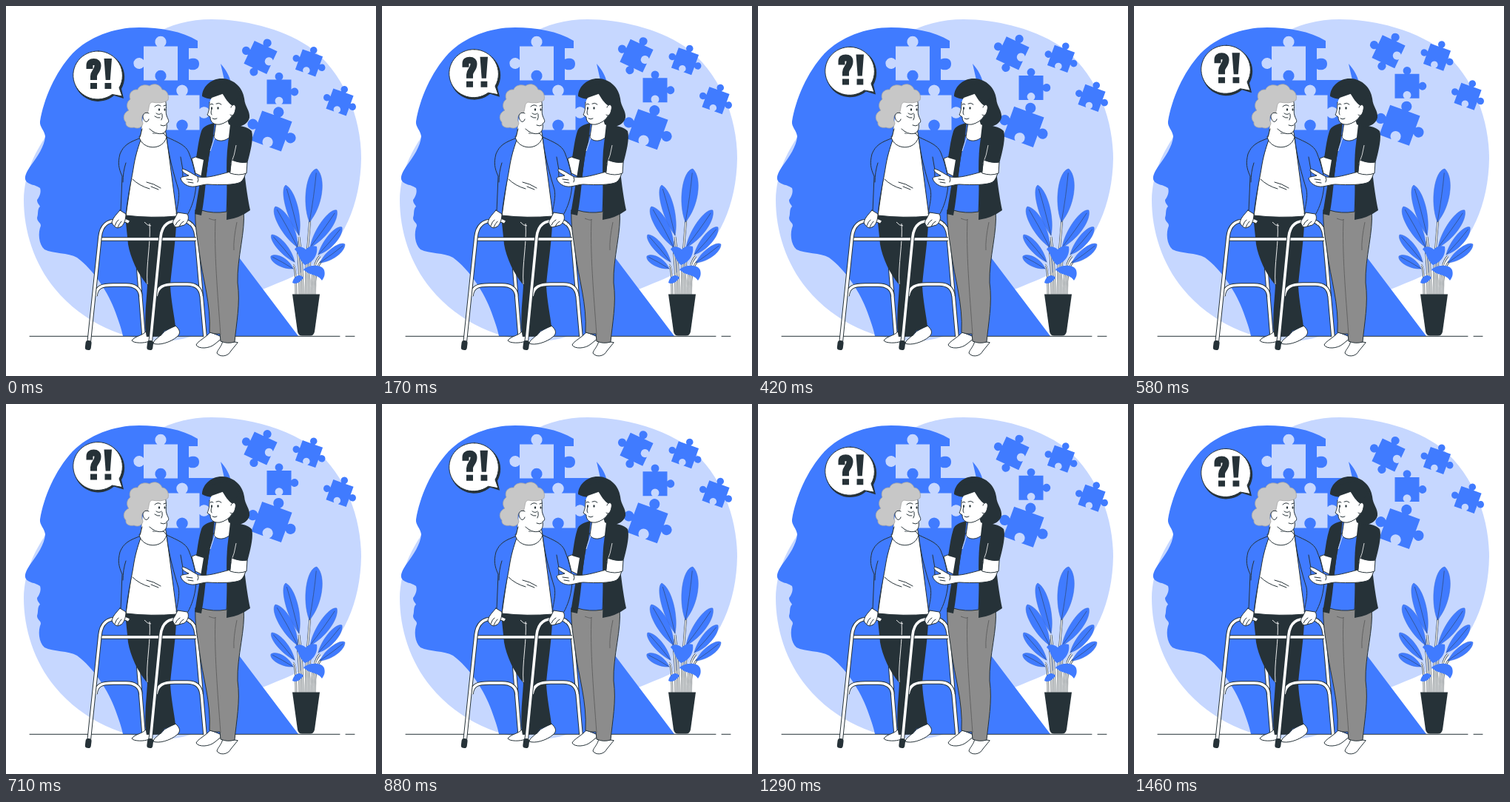
Recreate the animation shown at these times as an HTML page. Size 500 by 500 pixels, loop 1500 ms.

```html
<!DOCTYPE html>
<html lang="en">
<head>
<meta charset="utf-8">
<title>Walking together</title>
<style>
html, body { margin: 0; width: 100%; height: 100%; overflow: hidden; background: #fff; }
svg { display: block; width: 100vw; height: 100vh; }
.blue { fill: #407bff; }
.pale { fill: #c6d7ff; }
.dark { fill: #263238; }
.grey { fill: #8c8c8c; }
.skin { fill: #fff; }
.out { stroke: #263238; stroke-width: 1; stroke-linejoin: round; stroke-linecap: round; }
.line { fill: none; stroke: #263238; stroke-width: 1; stroke-linecap: round; stroke-linejoin: round; }
.tube { fill: none; stroke: #263238; stroke-width: 5.6; }
.core { fill: none; stroke: #fff; stroke-width: 3.6; }
</style>
</head>
<body>
<svg viewBox="0 0 500 500" xmlns="http://www.w3.org/2000/svg">
  <!-- backdrop -->
  <path class="pale" d="M200 38C222 25 248 18 278 18C320 18 372 30 408 54C456 88 480 150 480 206C479 268 456 322 412 352C380 374 342 380 312 402C284 428 264 450 216 453C160 453 104 428 66 382C38 348 24 304 24 262C25 226 38 200 54 176Z"/>
  <path class="blue" d="M180 29C145 29 112 42 90 64C66 90 51 126 46 156C45 163 52 168 53 176C52 190 42 204 34 215C29 222 25 229 26 234C28 242 40 241 46 246C48 252 45 258 42 262C42 267 45 268 46 271C42 274 44 281 42 286C42 292 47 292 47 297C43 306 44 322 52 329C64 335 84 333 96 340C118 356 139 388 148 414C153 428 156 436 158 446H395L312 336C298 318 296 290 300 262C306 220 318 160 304 104C302 94 297 86 290 78L295 100H247V85C250 87 261 88 261 78C261 69 250 70 247 72V57H259V47C238 34 208 29 180 29Z"/>
  <g id="holes" class="pale"></g>
  <path class="line" d="M32 446.3H451M459 446.3H471"/>

  <!-- floating parts -->
  <g id="float">
    <g id="pieces" class="blue"></g>
    <path class="dark" d="M127 63A33 33 0 0 1 156 112L159 125L146 121A33 33 0 1 1 127 63Z"/>
    <path class="skin out" d="M125 61A33 33 0 0 1 153 110.500L157 122L143.500 119.500A33 32.500 0 1 1 125 61Z"/>
    <path d="M113 85V80Q113 75.500 118.500 75.500Q124 75.500 124 80.500C124 88 118.500 89 118.500 95V100" fill="none" stroke="#263238" stroke-width="9"/>
    <path class="dark" d="M114 104H123V112H114ZM132.500 71H143L140.800 100H134.700ZM133.500 104H142.300V112H133.500Z"/>
  </g>

  <!-- plant -->
  <g id="plant"></g>
  <path class="dark" d="M387 389.500H424L417 440Q416 445.500 411 445.500H400Q395 445.500 394 440Z"/>

  <!-- older woman -->
  <g id="far"></g>
  <path class="skin out" d="M189 440C184 446 174 446 170 452C172 456 188 456 193 453L195 442Z"/>
  <path class="skin out" d="M229 432C236 438 236 443 231 447C222 455 206 459 199 456C200 450 210 446 214 440Z"/>
  <path class="dark" d="M161 283H230C231 310 224 350 222 378C223 398 227 416 229 433L214 439L209 446L190 447C186 428 190 398 191 377C178 362 168 340 165 322Z"/>
  <path d="M194 294C196 320 189 350 191 376M187 292Q191 297 196 297" fill="none" stroke="#fff" stroke-width=".9"/>
  <path class="skin out" d="M182 176L184 160H214L217 177L222 215L231 284Q196 287 162 283L172 214Z"/>
  <path class="blue out" d="M183 178C166 184 159 188 154 200C151 212 152 219 157 230L155 278L162 283C164 258 170 234 173 214C176 198 179 190 183 178Z"/>
  <path class="blue out" d="M217 177C232 184 243 188 247 198C254 216 259 235 256 250C254 264 249 276 244 284L230 281C232 268 235 258 233 248C227 228 220 204 217 177Z"/>
  <path class="line" d="M171 234Q180 243 194 247M190 238Q200 240 209 246M196 244L206 248M162 212Q158 224 158 238M236 204Q240 220 239 236"/>
  <path class="skin out" d="M180 177C184 195 212 196 217 177L213 172H186Z"/>
  <path class="skin" d="M182 176L185 150L196 125L216 126C218 136 215 142 217 148C219 154 222 156 217 159C218 164 217 170 212 172C207 174 201 172 198 171L199 180Z"/>
  <path class="line" d="M215 125C218 136 215 142 217 148C219 154 222 156 217 159C218 164 217 170 212 172C206 174 199 171 194 166M184 166L181 177"/>
  <path d="M219 127C221 119 216 113 211 113C208 105 199 104 194 108C187 105 179 108 178 113C170 112 165 119 168 126C162 130 163 138 166 141C159 144 157 152 162 157C161 164 169 165 173 164C179 167 185 163 185 158C181 152 185 143 191 145C194 139 192 132 197 130C204 131 213 132 219 127Z" fill="#c7c7c7" stroke="#a5a5a5" stroke-width=".8"/>
  <path class="skin out" d="M193 145C187 142 183 148 186 153C188 158 192 157 193 153"/>
  <path class="line" d="M201 136Q205 132 209 135M213 135L216 134M203 145Q207 148 210 145M201 149Q205 152 208 151M209 161Q213 163 216 161M211 146Q212 151 210 154"/>
  <ellipse class="dark" cx="207" cy="140" rx="1.200" ry="1.800"/>
  <ellipse class="dark" cx="214.500" cy="140" rx="1" ry="1.700"/>
  <g id="near"></g>
  <path class="skin out" d="M154 276L162 281C162 288 160 294 156 298L151 300C147 299 144 296 143 292C145 285 150 281 154 276Z"/>
  <path class="line" d="M147 297Q149 291 152 289M151 299Q153 294 156 291"/>
  <path class="skin out" d="M232 279L245 281C248 286 246 292 241 296L230 299C226 297 225 293 226 290C229 286 230 283 232 279Z"/>
  <path class="line" d="M229 296Q231 291 235 289M234 298Q236 293 240 291"/>

  <!-- younger woman -->
  <path class="skin out" d="M276 441C270 448 259 453 257 458C260 464 275 463 282 457L293 448Z"/>
  <path class="skin out" d="M293 452C292 460 286 464 285 469C289 475 300 474 304 466L313 455Z"/>
  <path class="grey out" d="M256 276H321C324 304 312 340 313 374C317 402 311 430 309 454Q299 457 290 453L289 443Q282 444 275 441C277 402 266 370 261 332C258 310 255 296 256 276Z"/>
  <path d="M274 287Q284 291 283 288C281 330 286 390 290 444M312 292Q307 316 308 330" fill="none" stroke="#5e5e5e" stroke-width=".9"/>
  <path class="skin out" d="M259 203L251 206L256 226L266 231L269 207Z"/>
  <path class="blue out" d="M278 175H303L298 278Q280 281 264 276Z"/>
  <path class="skin out" d="M284 157L281 177C284 184 297 184 303 176L307 154Z"/>
  <path class="dark" d="M282 158C273 160 266 163 264 169C260 182 259 194 257 205L267 208L255 281L264 283C271 248 270 212 279 184Z"/>
  <path class="dark" d="M303 160C314 161 327 163 332 169C335 179 330 198 326 213L322 222C324 242 327 262 330 276Q315 287 298 289C300 250 296 214 300 186Z"/>
  <path d="M290 164C283 172 280 184 276 196M311 188Q309 202 304 213" fill="none" stroke="#fff" stroke-width=".8"/>
  <path class="skin out" d="M303 224C287 228 273 233 260 231C253 228 246 222 239 220C236 222 240 226 247 229C242 231 237 230 236 233C238 240 246 245 255 244C262 243 267 241 272 241C290 242 309 242 317 238Q323 233 324 224Z"/>
  <path class="skin out" d="M305 208Q317 213 326 211L325 226Q315 230 303 226Z"/>
  <path class="line" d="M244 234L252 235M246 238L253 239M259 231Q261 235 259 238"/>
  <path class="dark" d="M265 122C265 108 279 97 293 98C309 99 320 111 322 125C323 137 330 141 329 151C326 162 313 166 301 160L290 124C281 127 271 126 265 122Z"/>
  <path class="skin" d="M278 124C273 131 275 139 272 147L276 150C276 157 281 161 289 160C300 158 305 151 309 142L302 128L295 118Z"/>
  <path class="line" d="M275 130C275 138 274 143 272 147L276 150C276 157 281 161 289 160C297 158 302 154 305 149"/>
  <path class="dark" d="M266 121Q277 116 291 116C296 124 300 131 305 134L317 120L298 104L275 110Z"/>
  <path class="skin out" d="M304 137C306 131 312 133 310 140C309 146 306 150 303 147"/>
  <path class="line" d="M276 133Q278 131 280 133M284 132Q288 130 291 133M279 152Q282 154 285 152M278 139Q276 145 278 147"/>
  <ellipse class="dark" cx="278" cy="138" rx="1" ry="1.700"/>
  <ellipse class="dark" cx="286.500" cy="138" rx="1.200" ry="1.800"/>
</svg>
<script>
const PERIOD = 1500, RISE = 10;
const $ = id => document.getElementById(id);

// Jigsaw outline; sides run top, right, bottom, left: 1 knob, -1 notch, 0 flat.
function jigsaw(cx, cy, size, turn, sides) {
  const h = size / 2, neck = size * .1, r = size * .165;
  const dirs = [[1, 0], [0, 1], [-1, 0], [0, -1]];
  let d = `M${-h} ${-h}`;
  sides.forEach((side, i) => {
    const [x, y] = dirs[i];
    const at = t => `${x * t + y * h} ${y * t - x * h}`;
    if (side) d += `L${at(-neck)}A${r} ${r} 0 1 ${side > 0 ? 1 : 0} ${at(neck)}`;
    d += `L${at(h)}`;
  });
  return `<path d="${d}Z" transform="translate(${cx} ${cy}) rotate(${turn})"/>`;
}

function leaf(x, y, tx, ty, w) {
  const dx = tx - x, dy = ty - y, len = Math.hypot(dx, dy);
  const p = (t, s) => `${x + dx * t - dy / len * s * w} ${y + dy * t + dx / len * s * w}`;
  return `<path class="blue" d="M${x} ${y}C${p(.3, .75)} ${p(.85, .8)} ${tx} ${ty}C${p(.95, -.7)} ${p(.35, -.75)} ${x} ${y}Z" stroke="#3568d8" stroke-width=".5"/>` +
    `<path class="line" style="stroke-width:.5" d="M${x} ${y}Q${p(.5, .08)} ${p(.92, 0)}"/>`;
}

const stem = (x, tx, ty) =>
  `<path class="tube" style="stroke-width:2.6" d="M${x} 390Q${x} 350 ${tx} ${ty}"/>` +
  `<path class="core" style="stroke-width:1.4" d="M${x} 390Q${x} 350 ${tx} ${ty}"/>`;

const pipe = d => `<path class="tube" d="${d}"/><path class="core" d="${d}"/>`;
const foot = (x, y) => `<rect class="dark" x="${x - 4}" y="${y}" width="8" height="13" rx="3.500" transform="rotate(7 ${x} ${y})"/>`;

$('holes').innerHTML =
  jigsaw(209, 77.5, 46, 0, [1, 0, -1, 1]) +
  jigsaw(238, 144, 47, 0, [1, 1, -1, 0]);

$('pieces').innerHTML =
  jigsaw(344, 69.5, 34, 25, [1, -1, 1, 1]) +
  jigsaw(409.5, 77, 29, 20, [1, 1, -1, 1]) +
  jigsaw(369, 116, 33, 0, [1, 1, -1, 0]) +
  jigsaw(451, 130, 29, 20, [1, 1, -1, 1]) +
  jigsaw(359, 169, 43, 20, [1, 1, -1, 1]);

$('plant').innerHTML =
  [[392, 388, 350], [397, 393, 318], [401, 396, 312], [405, 411, 288], [409, 414, 322], [413, 424, 338], [417, 428, 344]]
    .map(s => stem(...s)).join('') +
  [[410, 292, 420, 220, 19], [396, 310, 378, 242, 14], [411, 326, 447, 276, 14],
   [394, 326, 364, 271, 15], [422, 336, 454, 299, 12], [390, 346, 359, 309, 11],
   [424, 347, 458, 322, 11], [388, 355, 358, 338, 11]]
    .map(s => leaf(...s)).join('') +
  `<path class="blue" d="M405 329C399 323 391 325 390 329C395 332 396 344 404 350C414 347 422 337 420 325C414 323 409 325 405 329Z"/>
   <path class="blue" d="M402 356C410 349 427 349 430 357C432 364 429 368 427 371C422 362 410 365 402 356Z"/>
   <path class="blue" d="M402 367C397 361 389 364 387 374C392 377 398 373 402 367Z"/>`;

$('far').innerHTML =
  pipe('M165 291Q174 296 175 308L186 445') + pipe('M247 292Q256 298 257 310L269 447');

$('near').innerHTML =
  pipe('M121 392C122 379 130 377 145 377H162C174 377 181 382 182 392') +
  pipe('M203 392C205 379 213 376 228 376H245C257 376 263 382 264 392') +
  pipe('M126 315H257') +
  pipe('M112 456L127 312C129 294 139 290 150 290Q160 288 166 292') +
  pipe('M195 456L209 312C211 294 221 290 234 290Q245 289 250 295') +
  foot(112, 452) + foot(195.5, 452);

function draw(now) {
  const p = now % PERIOD / PERIOD;
  const lift = RISE * (1 - Math.abs(1 - 2 * p));
  $('float').setAttribute('transform', `translate(0 ${-lift})`);
}

const start = performance.now();
function tick() {
  draw(performance.now() - start);
  requestAnimationFrame(tick);
}
draw(0);
requestAnimationFrame(tick);
</script>
</body>
</html>
```
